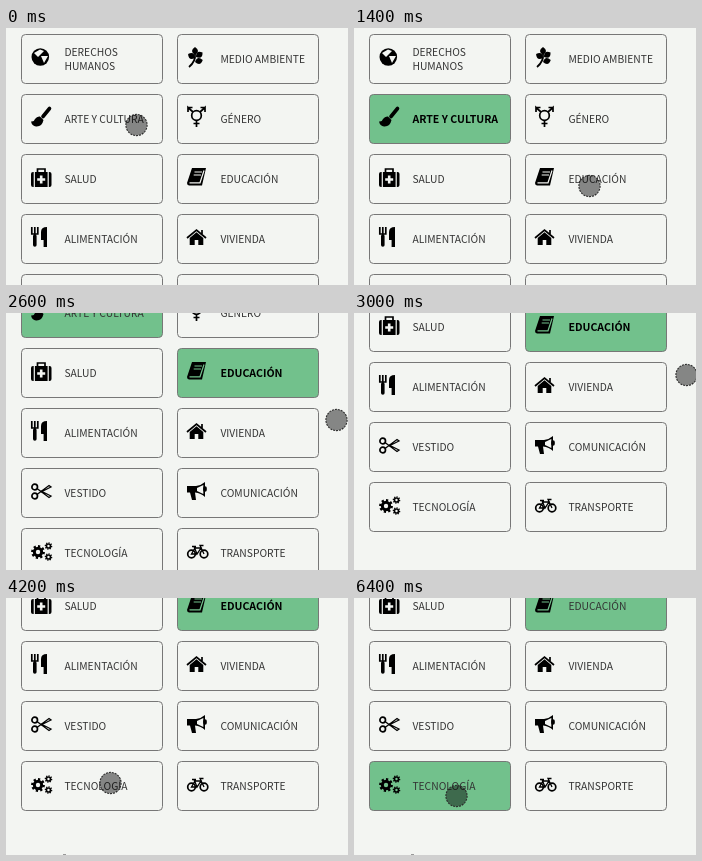
Write an HTML page that moves like this. It is 342x257 px and loops after 7.6 s.

```html
<!DOCTYPE html>
<html lang="es">
<head>
<meta charset="utf-8">
<style>
html, body { margin: 0; width: 100%; height: 100%; overflow: hidden; background: #f3f5f2; }
svg { display: block; }
.card { --bg: #f3f5f2; }
.card.on { --bg: #72c18c; }
.box { fill: var(--bg); stroke: #777; }
text { font: 300 10.3px "Noto Sans CJK JP", "Noto Sans CJK SC", "Noto Sans CJK", "Open Sans", sans-serif; fill: #333; }
.bold text { font-weight: 900; font-size: 10.6px; fill: #000; }
.hole { fill: var(--bg); }
.line, .thin, .thick { fill: none; stroke: #000; stroke-width: 1.7; }
.thin { stroke-width: 1.3; }
.thick { stroke-width: 3.6; stroke-linecap: round; }
.cut { fill: none; stroke: var(--bg); stroke-width: 1.2; }
.cross { stroke: var(--bg); stroke-width: 2.6; }
#touch { fill: rgba(0, 0, 0, .45); stroke: #2c2c2c; stroke-width: 1.1; stroke-dasharray: 2 1; }
</style>
</head>
<body>
<svg width="342" height="257">
  <defs>
    <g id="globe"><circle cx="9.3" cy="11" r="8.8"/><path class="hole" d="M3 7L9 3.5L13 5L7 11ZM10 10H17L13 17Z"/></g>
    <path id="blade" d="M0 0Q-6-4 0-8Q6-4 0 0"/>
    <g id="leaf">
      <use href="#blade" x="8" y="9"/>
      <use href="#blade" transform="translate(8 12)rotate(-60)"/>
      <use href="#blade" transform="translate(9 11)rotate(55)"/>
      <use href="#blade" transform="translate(8 16)rotate(75)"/>
      <path class="line" d="M8 8Q9 15 2 21"/>
    </g>
    <g id="brush"><path class="thick" d="M18.5 2.5L12 10.5"/><path d="M9 10.5L12.5 14Q11 21 5 20.5Q1 20 0 15.5Q3 16 4 13Q6 10 9 10.5"/></g>
    <path id="arrow" class="line" d="M6 6L1 1.5V6M1 1.5H5.5"/>
    <g id="gender">
      <circle class="line" cx="9.5" cy="9.5" r="4.8"/><use href="#arrow"/>
      <use href="#arrow" transform="translate(19)scale(-1 1)"/><path class="line" d="M9.5 14V21M6.5 17.5H12.5"/>
    </g>
    <g id="kit"><rect y="6" width="20.5" height="15" rx="2"/><path class="line" d="M6.5 6V3H14V6"/><path class="cut" d="M3.3 6V21M17.2 6V21"/><path class="cross" d="M10.2 9.5V17.5M6.2 13.5H14.2"/></g>
    <g id="book"><path d="M5 2H19L15 19.5H2Q0 19 0 17Z"/><path class="cut" d="M7.5 6H15M6.7 9H14M2.5 16.8H13L17 4.5"/></g>
    <g id="cutlery"><path class="line" d="M.8 1V8H6.8V1M3.8 1V9"/><path class="thick" d="M3.8 10V19"/><path d="M10 6Q10 1 16 1V21H12.6V14H10Z"/></g>
    <g id="home"><path class="line" d="M0 12L9.5 4L19 12M15 4V8"/><path d="M9.5 6.3L16.3 12V19H11.3V14H7.7V19H2.7V12Z"/></g>
    <g id="half"><circle class="line" cx="3.7" cy="7" r="2.8"/><path class="thin" d="M6 8.5L18 17.5L20 16L10 11"/></g>
    <g id="scissors"><use href="#half"/><use href="#half" transform="translate(0 23)scale(1-1)"/></g>
    <g id="horn"><path d="M0 6H9Q14 5.5 18 2V17Q14 13 8 12.5L9 20H5L3 12.5H0Z"/><path class="hole" d="M10 8L16.3 5V14L10 11Z"/><path class="thick" d="M18 8V10"/></g>
    <g id="cog">
      <circle r="5.2"/><circle class="hole" r="2.2"/>
      <circle r="5.8" fill="none" stroke="#000" stroke-width="2.2" pathLength="16" stroke-dasharray="1"/>
    </g>
    <g id="cogs"><use href="#cog" x="7" y="12"/><use href="#cog" transform="translate(17.5 6)scale(.55)"/><use href="#cog" transform="translate(17.5 17)scale(.55)"/></g>
    <circle id="wheel" class="line" cy="14" r="3.8"/>
    <g id="bike"><use href="#wheel" x="4.5"/><use href="#wheel" x="17"/><path class="thin" d="M10 14H4.5L8 8H14L10 14L7 6.5M5 6.5H9M17 14L13 5.5H16.5"/></g>
  </defs>
  <g id="page"></g>
  <circle id="touch" r="10.6"/>
</svg>
<script>
const topics = `globe:DERECHOS/HUMANOS,leaf:MEDIO AMBIENTE,brush:ARTE Y CULTURA,gender:GÉNERO,
kit:SALUD,book:EDUCACIÓN,cutlery:ALIMENTACIÓN,home:VIVIENDA,
scissors:VESTIDO,horn:COMUNICACIÓN,cogs:TECNOLOGÍA,bike:TRANSPORTE`;

const page = document.getElementById('page');
const touch = document.getElementById('touch');

page.innerHTML = topics.split(',').map((topic, i) => {
  const [icon, label] = topic.trim().split(':');
  const lines = label.split('/');
  const y = 36 - 7 * lines.length;
  return `<g class="card" transform="translate(${15 + i % 2 * 156} ${6 + (i >> 1) * 60})">
    <rect class="box" x=".5" y=".5" width="141" height="49" rx="4"/>
    <use href="#${icon}" x="10" y="12"/>
    ${lines.map((s, n) => `<text x="43.4" y="${y + n * 14}">${s}</text>`).join('')}</g>`;
}).join('') + '<rect x="57" y="399" width="3" height="1" fill="#999"/>';

const cards = page.querySelectorAll('.card');

// time, x, y of the touch point
const moves = [
  [0, 130, 97], [200, 113, 90], [800, 113, 90], [1400, 235, 158], [1600, 236, 158],
  [2000, 330, 198], [2200, 330, 185], [2600, 330, 107], [3000, 332, 62], [3200, 331, 62],
  [4200, 104, 185], [4400, 103, 152], [4800, 102, 215], [5600, 102, 215], [6200, 102, 198]
];
// time, page offset
const scrolls = [[2000, 0], [2200, 13], [2600, 91], [3000, 137], [3200, 143]];
const picks = [
  { card: 2, bold: 800, thin: 1600, on: 800 },
  { card: 5, bold: 1600, thin: 5200, on: 1600 },
  { card: 10, bold: 5200, thin: 6400, on: 6400 }
];

function at(keys, t, k) {
  const next = keys.findIndex(key => key[0] > t);
  if (next < 0) return keys[keys.length - 1][k];
  if (next === 0) return keys[0][k];
  const a = keys[next - 1], b = keys[next];
  return Math.round(a[k] + (b[k] - a[k]) * (t - a[0]) / (b[0] - a[0]));
}

const start = performance.now();

function draw() {
  // The picture advances in steps of 200 ms
  const t = Math.floor((performance.now() - start) % 7600 / 200) * 200;
  page.setAttribute('transform', `translate(0 ${-at(scrolls, t, 1)})`);
  touch.setAttribute('transform', `translate(${at(moves, t, 1) + .5} ${at(moves, t, 2)})`);
  for (const { card, bold, thin, on } of picks) {
    cards[card].classList.toggle('bold', t >= bold && t < thin);
    cards[card].classList.toggle('on', t >= on);
  }
  requestAnimationFrame(draw);
}
draw();
</script>
</body>
</html>
```
